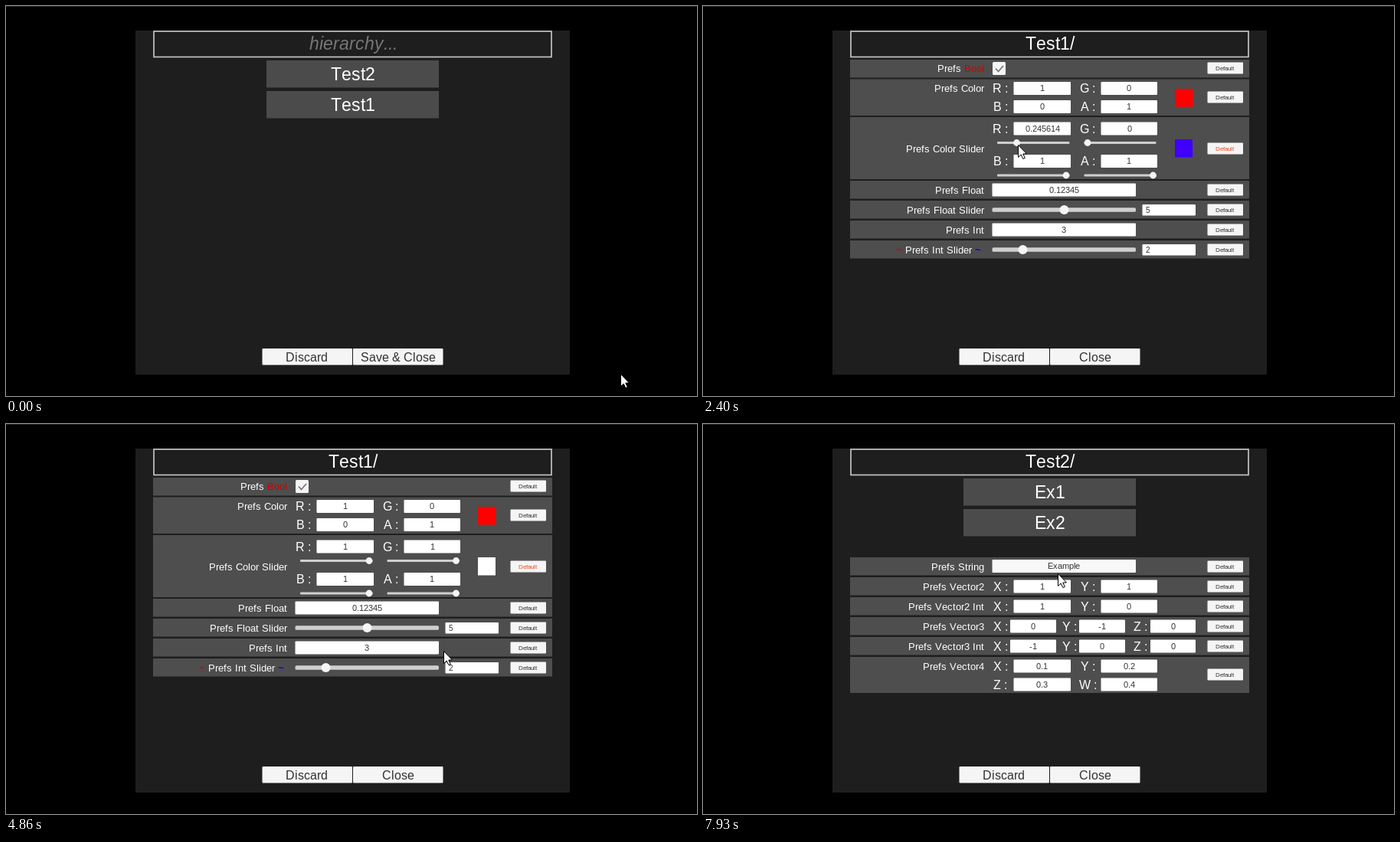
Write an HTML page that moves like this. It is 902 px wide and 509 px high and loops after 8000 ms.

```html
<!DOCTYPE html>
<html lang="en">
<head>
<meta charset="utf-8">
<title>Preferences menu</title>
<style>
  html, body { margin: 0; width: 100%; height: 100%; overflow: hidden; background: #000; }
  svg { display: block; width: 902px; height: 509px; font-family: "Liberation Sans", Arial, sans-serif; }
</style>
</head>
<body>
<svg id="stage" viewBox="0 0 902 509"></svg>
<script>
const LOOP = 8000;
const INK = '#323232', ROW = '#4e4e4e', BUTTON = '#4b4b4b', LIGHT = '#f5f5f5';
const pen = document.createElement('canvas').getContext('2d');

// Glyph advances are rounded to whole pixels, as in a bitmap font.
function advances(s, size, style = '') {
  pen.font = `${style} ${size}px "Liberation Sans", Arial, sans-serif`;
  return [...s].map(c => Math.round(pen.measureText(c).width));
}

function glyphs(s, x, size, align, style) {
  const adv = advances(s, size, style);
  const total = adv.reduce((a, b) => a + b, 0);
  let at = Math.round(x - total * { start: 0, middle: 0.5, end: 1 }[align]);
  return adv.map(w => (at += w) - w).join(' ');
}

function text(s, x, y, size, { fill = '#fff', align = 'middle', style = '', id = '' } = {}) {
  const css = style === 'bold' ? 'font-weight="bold"' : style ? `font-style="${style}"` : '';
  return `<text id="${id}" x="${glyphs(s, x, size, align, style)}" y="${Math.round(y + size * 0.35)}" ` +
    `font-size="${size}" fill="${fill}" ${css}>${s.replace('&', '&amp;')}</text>`;
}

const rect = (x, y, w, h, fill, extra = '') =>
  `<rect x="${x}" y="${y}" width="${w}" height="${h}" fill="${fill}" ${extra}/>`;

const row = (y, h = 23.5) => rect(192, y, 521, h, ROW);
const label = (s, y, x = 367) => text(s, x, y, 13, { align: 'end' });
const axis = (s, x, y) => text(s + ' :', x, y, 16);
const reset = (y, id = '') =>
  rect(658.5, y - 7.5, 46.5, 15, LIGHT, 'rx="1"') + text('Default', 681, y, 8, { fill: INK, id });

function field(s, x, y, w, id = '') {
  return rect(x, y - 8.5, w, 17, '#fff', `rx="1" id="${id && id + 'Box'}"`) +
    text(s, x + w / 2, y, 11, { fill: INK, id });
}

function smallField(s, y) {
  return rect(573.5, y - 7, 69.5, 14.5, '#fff', 'rx="1"') +
    text(s, 578, y, 10, { fill: INK, align: 'start' });
}

function slider(x, y, w, thick, knob, r, id = '') {
  return rect(x, y - thick / 2, w, thick, '#cfcfcf', `rx="${thick / 3}"`) +
    `<circle id="${id}" cx="${knob}" cy="${y}" r="${r}" fill="${LIGHT}"/>`;
}

// Two columns of named fields: [name, value, id]
const pair = (y, a, b) =>
  axis(a[0], 388, y) + field(a[1], 405.5, y, 74.5, a[2]) +
  axis(b[0], 502, y) + field(b[1], 519.5, y, 73.5, b[2]);

const triple = (y, values) => values.map((v, i) =>
  axis('XYZ'[i], [388, 478.5, 571][i], y) + field(v, [401, 491, 584][i], y, [60, 60, 59][i])).join('');

const bigButton = (s, y, id) => rect(340, y, 225, 35.5, BUTTON, `id="${id}"`) + text(s, 453, y + 18, 23);
const closeText = s => text(s, 512, 458, 16, { fill: INK });

const home =
  text('hierarchy...', 453, 49, 23, { fill: '#777', style: 'italic' }) +
  bigButton('Test2', 71, 'open2') + bigButton('Test1', 111, 'open1') + closeText('Save & Close');

const test1 = text('Test1/', 453, 49, 23) +
  row(70) + label('Prefs', 81, 337) +
  text('Bool', 367, 81, 13, { fill: '#d00000', align: 'end' }) +
  rect(378, 73, 17, 17, LIGHT, 'rx="1.5"') +
  '<path d="M382 81.5l3.5 4 6.500-7.500" fill="none" stroke="#777" stroke-width="1.8"/>' + reset(81) +
  row(95.5, 47.5) + label('Prefs Color', 107) +
  pair(107.5, ['R', '1'], ['G', '0']) + pair(131.5, ['B', '0'], ['A', '1']) +
  rect(616, 108, 23.5, 23.5, '#f00') + reset(119) +
  row(145, 81) + label('Prefs Color Slider', 186) +
  pair(160, ['R', '0', 'red'], ['G', '0', 'green']) + pair(202.5, ['B', '1'], ['A', '1']) +
  slider(384, 178.5, 94.5, 3, 388.5, 4.4, 'redKnob') + slider(497.5, 178.5, 94, 3, 502, 4.4, 'greenKnob') +
  slider(384, 221, 94.5, 3, 474, 4.4) + slider(497.5, 221, 94, 3, 587.5, 4.4) +
  rect(616, 174, 23, 23.5, '#00f', 'id="swatch"') + reset(186, 'colorReset') +
  row(228) + label('Prefs Float', 240) + field('0.12345', 377.5, 240, 187.5) + reset(240) +
  row(254) + label('Prefs Float Slider', 266) + slider(377.5, 266, 187.5, 5.5, 471.5, 6) +
  smallField('5', 266) + reset(266) +
  row(280) + label('Prefs Int', 292) + field('3', 377.5, 292, 187.5) + reset(292) +
  row(306) + label('Prefs Int Slider', 318, 351) +
  text('~', 260, 318, 13, { fill: '#d00000', align: 'end', style: 'bold' }) +
  text('~', 363, 318, 13, { fill: '#0000f0', align: 'end', style: 'bold' }) +
  slider(377.5, 318, 187.5, 5.5, 417.5, 6) + smallField('2', 318) + reset(318) + closeText('Close');

const test2 = text('Test2/', 453, 49, 23) +
  bigButton('Ex1', 71, 'ex1') + bigButton('Ex2', 111, 'ex2') +
  row(174) + label('Prefs String', 186) + field('Example', 377.5, 185.5, 187.5, 'example') + reset(186) +
  row(200) + label('Prefs Vector2', 212) + pair(212, ['X', '1'], ['Y', '1']) + reset(212) +
  row(226) + label('Prefs Vector2 Int', 238) + pair(238, ['X', '1'], ['Y', '0']) + reset(238) +
  row(252) + label('Prefs Vector3', 264) + triple(264, ['0', '-1', '0']) + reset(264) +
  row(278) + label('Prefs Vector3 Int', 290) + triple(290, ['-1', '0', '0']) + reset(290) +
  row(304, 47) + label('Prefs Vector4', 316) + pair(316, ['X', '0.1'], ['Y', '0.2']) +
  pair(340, ['Z', '0.3'], ['W', '0.4']) + reset(327) + closeText('Close');

const screens = { home, test1, test2 };
document.getElementById('stage').innerHTML =
  rect(0, 0, 902, 509, '#000') + rect(0, 0, 902, 1, '#262626') +
  rect(169, 32, 567, 449, '#1e1e1e') +
  rect(193, 33, 519, 33.5, 'none', 'stroke="#c4c4c4" stroke-width="1.7"') +
  rect(334.5, 447, 117.5, 21.5, LIGHT, 'rx="1"') +
  rect(453, 447, 117.5, 21.5, LIGHT, 'rx="1" id="close"') +
  text('Discard', 392.5, 458, 16, { fill: INK }) +
  Object.entries(screens).map(([id, body]) => `<g id="${id}">${body}</g>`).join('') +
  '<path id="cursor" d="M.5.5V16.500L4.200 13 6.800 18.500 9.300 17.500 6.800 12H11.500Z" fill="#fff" stroke="#000"/>';

// Pointer moves: first and last step in ms, number of steps, end point
const moves = [
  [70, 150, 2, 685, 315], [300, 760, 7, 505, 134], [1250, 1710, 7, 393, 180],
  [1940, 1940, 1, 390, 180], [2240, 3010, 11, 505, 183],
  [3090, 3240, 3, 496, 171], [3320, 3400, 2, 487, 178],
  [3550, 3780, 4, 499, 171], [3940, 3940, 1, 487, 166],
  [4090, 4165, 2, 501, 177], [4240, 4550, 5, 595, 182], [4625, 4860, 4, 571, 296],
  [4930, 5170, 4, 546, 442], [5320, 5400, 2, 546, 450], [5780, 6320, 8, 497, 98],
  [6630, 7160, 8, 467, 210], [7240, 7240, 1, 467, 212],
  [7470, 7700, 4, 461, 201], [7780, 7930, 3, 463, 195]
];

function pointer(t) {
  let x = 802, y = 480;
  for (const [from, to, n, ex, ey] of moves) {
    if (t < from) break;
    const step = n > 1 ? Math.floor((t - from) / (to - from) * (n - 1) + 0.06) : 0;
    let u = Math.min(1, (step + 1) / n);
    if (n > 4) u = u * u * (3 - 2 * u);
    x += (ex - x) * u;
    y += (ey - y) * u;
  }
  return [Math.round(x), Math.round(y)];
}

const clamp = v => Math.max(0, Math.min(1, v));
const drag = (t, from, to, x, start) => t < from ? 0 : t >= to ? 1 : clamp((x - start) / 85.5);
const $ = Object.fromEntries([...document.querySelectorAll('[id]')].map(e => [e.id, e]));

function setValue(name, v, cx, knobX) {
  const s = String(+v.toPrecision(7));
  $[name].textContent = s;
  $[name].setAttribute('x', glyphs(s, cx, 11, 'middle'));
  $[name + 'Knob'].setAttribute('cx', knobX + 85.5 * v);
}

function hover(id, on, color, idle) {
  $[id].setAttribute('fill', on ? color : idle);
}

function draw(t) {
  const [x, y] = pointer(t);
  const screen = t >= 1000 && t < 5550 ? 'test1' : t >= 6400 ? 'test2' : 'home';
  for (const id in screens) $[id].style.display = id === screen ? '' : 'none';

  const r = drag(t, 2240, 3010, x, 390), g = drag(t, 4240, 4550, x, 501);
  setValue('red', r, 443, 388.5);
  setValue('green', g, 556.5, 502);
  $.swatch.setAttribute('fill', `rgb(${Math.round(r * 255)},${Math.round(g * 255)},255)`);
  hover('colorReset', r > 0, '#f04a20', INK);

  const over = (x0, y0, w, h) => x >= x0 && x < x0 + w && y >= y0 && y < y0 + h;
  for (const [id, top] of [['open2', 71], ['ex1', 71], ['open1', 111], ['ex2', 111]])
    hover(id, over(340, top, 225, 36), '#494949', BUTTON);
  hover('close', over(453, 447, 118, 22), '#ebecee', LIGHT);
  hover('exampleBox', over(378, 177, 187, 19), '#f8f8f8', '#fff');
  $.cursor.setAttribute('transform', `translate(${x} ${y})`);
}

const begin = performance.now();
function tick() {
  draw((performance.now() - begin) % LOOP);
  requestAnimationFrame(tick);
}
tick();
</script>
</body>
</html>
```
